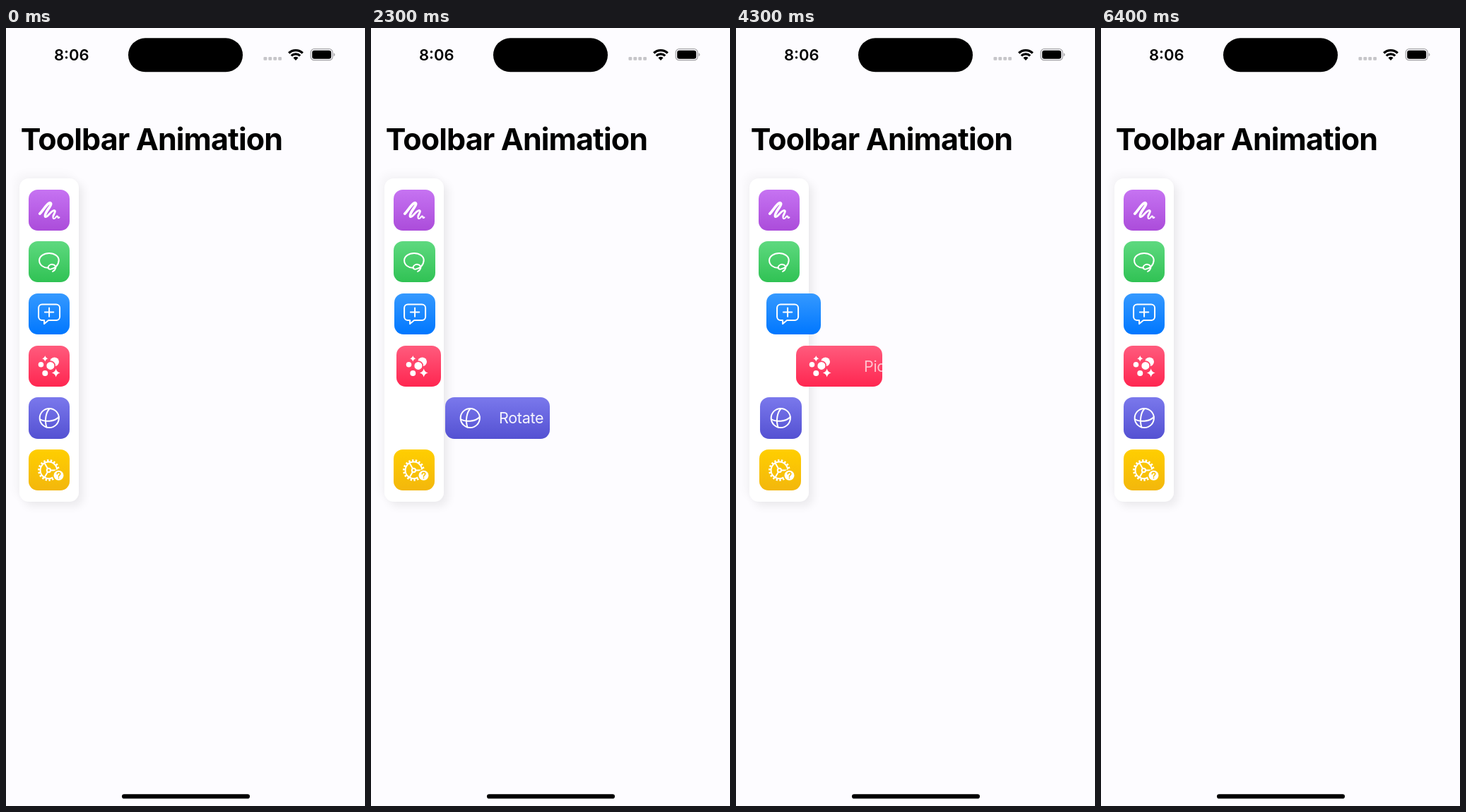
Write an HTML page that moves like this. It is 508 px wide and 1102 px high and loops after 6500 ms.

```html
<!DOCTYPE html>
<html lang="en">
<head>
<meta charset="utf-8">
<title>Toolbar Animation</title>
<style>
  html, body { margin: 0; width: 100%; height: 100%; overflow: hidden; background: #fdfcff; }
  body { position: relative; font-family: Inter, Roboto, sans-serif; }
  #chrome { position: absolute; left: 0; top: 0; }
  #panel {
    position: absolute; left: 19.4px; top: 213px; width: 84px; height: 457.5px;
    border-radius: 13px; background: #fff;
    box-shadow: 6px 6px 13px rgba(0, 0, 0, .075), -6px -6px 13px rgba(0, 0, 0, .035);
  }
  .tool { position: absolute; height: 58.2px; border-radius: 13px; overflow: hidden; }
  .tool svg {
    position: absolute; top: 0; width: 58.2px; height: 58.2px;
    fill: none; stroke: #fff; stroke-width: 2; stroke-linecap: round; stroke-linejoin: round;
  }
  .tool .solid { fill: #fff; stroke: none; }
  .tool span {
    position: absolute; top: 0; color: #fff; white-space: nowrap;
    font-size: 21.5px; line-height: 58.5px; letter-spacing: -.3px;
  }
</style>
</head>
<body>
<svg id="chrome" width="508" height="1102" viewBox="0 0 508 1102">
  <text x="68" y="46" font-size="22" font-weight="600">8:06</text>
  <rect x="173" y="14.3" width="162" height="48" rx="24"/>
  <g fill="#c6c5c9">
    <rect x="364.5" y="41" width="4.8" height="4.8" rx="1.2"/>
    <rect x="371.4" y="41" width="4.8" height="4.8" rx="1.2"/>
    <rect x="378.3" y="41" width="4.8" height="4.8" rx="1.2"/>
    <rect x="385.2" y="41" width="4.8" height="4.8" rx="1.2"/>
  </g>
  <g transform="translate(410 46)">
    <path d="M0 0L-3.5-3.7A5 5 0 0 1 3.5-3.7Z"/>
    <path d="M-6.2-6.6A9 9 0 0 1 6.2-6.6M-9.8-10.5A14.3 14.3 0 0 1 9.8-10.5" fill="none" stroke="#000" stroke-width="3.3"/>
  </g>
  <rect x="431.2" y="29.7" width="31" height="16" rx="5" fill="none" stroke="#a5a4a8" stroke-width="1.3"/>
  <rect x="433.2" y="31.7" width="27" height="12" rx="3.3"/>
  <path d="M463.7 35.2q1.8.7 1.8 2.5t-1.8 2.5z" fill="#a5a4a8"/>
  <text x="20.8" y="173.3" font-size="43" font-weight="700" letter-spacing="-.88">Toolbar Animation</text>
  <rect x="164" y="1085.3" width="181" height="6.2" rx="3.1"/>
</svg>
<div id="panel"></div>

<script>
const LOOP = 6500, STEP = 100;
const LEFT = 32.3, TOP = 228.6, PITCH = 73.7, SIZE = 58.2;
const SHIFT = 77.6, ICON_INSET = 6.46, LABEL_X = 181;
const OMEGA = 2 * Math.PI / 0.5;

const dot = (x, y, r, extra = '') => `<circle class="solid" cx="${x}" cy="${y}" r="${r}" ${extra}/>`;
const sparkle = (x, y, r) => {
  const c = r * 0.2;
  return `<path class="solid" d="M${x} ${y - r}Q${x + c} ${y - c} ${x + r} ${y}Q${x + c} ${y + c} ${x} ${y + r}` +
    `Q${x - c} ${y + c} ${x - r} ${y}Q${x - c} ${y - c} ${x} ${y - r}Z"/>`;
};

const icons = {
  scribble: `
    <path stroke-width="3.7" d="M-13.3 5C-9 1-4-8.5.5-10.3C3-11 3-8.5 1.5-6C-1-1.5-7 5-5.5 8.8"/>
    <path stroke-width="2.9" d="M-5.5 8.8C-3.5 12 2.5.5 7 .3C10 .8 7 5 5.8 8"/>
    <path stroke-width="2.1" d="M5.8 8C4.5 12 7 13 9 10.5C10.5 8.5 12 7.5 12.3 9.5C12.4 11.5 13.3 11.2 14.3 10.2"/>`,
  lasso: `
    <path d="M-1 8.6C-8 8.8-14 4.5-14-1.8C-14-8-7.5-12 0-12C7.5-12 13.6-8 13.6-2C13.6 4.5 8 9.8 2.5 10.5
      C-.5 10.8-2 9.3-1.4 7.4C-.5 4.7 2.5 3.5 5 3.8C8.5 4.2 9.8 7 9 9.5C8.4 11.7 7 13 5 13.8"/>`,
  comment: `
    <path d="M-10-13.7H10a5 5 0 0 1 5 5V4a5 5 0 0 1-5 5H-1L-7 14V9H-10a5 5 0 0 1-5-5V-8.7a5 5 0 0 1 5-5Z"/>
    <path d="M-6.2-2.5H6.2M0-8.7V3.7"/>`,
  bubbles:
    dot(7.5, -6.3, 6.4) +
    dot(1.8, -.7, 6.3, 'style="stroke:#ff4469;stroke-width:1.6"') +
    dot(-11.6, -2.4, 3.8) + dot(-5.8, 10, 4) +
    sparkle(-5.8, -10.8, 4.3) + sparkle(9.6, 9.3, 6),
  rotate: `
    <g transform="translate(.2 .4)">
      <circle r="13.6"/>
      <path d="M.5-13.5C-5-8-7 4-3.8 13M-13.5 1.5C-7 5.8 7 5.5 13.5-1.5"/>
    </g>`,
  settings: `
    <g transform="translate(-.7 .3)">
      <circle r="11.8"/>
      <circle r="13.9" stroke-width="2.8" stroke-linecap="butt" pathLength="36" stroke-dasharray="1 1"/>
      <circle r="2.6"/>
      <path d="M2.8 0H12M-1.4-2.4L-6-10.4M-1.4 2.4L-6 10.4"/>
    </g>
    <circle cx="13.4" cy="7.6" r="8.7" fill="#f8c106" stroke="none"/>
    ${dot(13.4, 7.6, 7)}
    <path stroke="#f8c106" stroke-width="1.7" d="M11.2 5.6C11.2 2.8 15.7 2.8 15.7 5.5C15.7 7.3 13.4 7.2 13.4 9M13.4 11.3v.1"/>`
};

// spans: [activated, deactivated] in ms for each visit of the finger
const tools = [
  { label: 'Scribble', icon: 'scribble', colors: ['#c673f2', '#ab4cda'], width: 171, spans: [[1050, 1214], [5051, 5490]] },
  { label: 'Lasso', icon: 'lasso', colors: ['#5ed97f', '#30c254'], width: 146, spans: [[1230, 1418], [4620, 5018]] },
  { label: 'Comment', icon: 'comment', colors: ['#3599ff', '#0077ff'], width: 184, spans: [[1446, 1690], [4247, 4580]] },
  { label: 'Picker', icon: 'bubbles', colors: ['#ff5b7d', '#ff2650'], width: 151, spans: [[1700, 1927], [3900, 4218]] },
  { label: 'Rotate', icon: 'rotate', colors: ['#7a78ec', '#5451d2'], width: 153, spans: [[1938, 2330], [3760, 3855]] },
  { label: 'Settings', icon: 'settings', colors: ['#ffce00', '#f3b70c'], width: 171, spans: [[2340, 3755]] }
];

tools.forEach((tool, i) => {
  const box = document.createElement('div');
  box.className = 'tool';
  box.style.top = TOP + i * PITCH + 'px';
  box.style.background = `linear-gradient(${tool.colors})`;
  box.innerHTML = `<svg viewBox="-29.1 -29.1 58.2 58.2">${icons[tool.icon]}</svg><span>${tool.label}</span>`;
  document.body.append(box);
  Object.assign(tool, { box, svg: box.firstChild, text: box.lastChild });
});

// Critically damped spring response
function spring(ms) {
  if (ms <= 0) return 0;
  const x = OMEGA * ms / 1000;
  return 1 - (1 + x) * Math.exp(-x);
}

function render(t) {
  for (const { box, svg, text, width, spans } of tools) {
    const p = spans.reduce((sum, [on, off]) => sum + spring(t - on) - spring(t - off), 0);
    const x = LEFT + SHIFT * p;
    box.style.left = x + 'px';
    box.style.width = SIZE + (width - SIZE) * p + 'px';
    svg.style.left = ICON_INSET * p + 'px';
    text.style.left = LABEL_X - x + 'px';
    text.style.opacity = p;
  }
}

const start = performance.now();
function tick() {
  const t = (performance.now() - start) % LOOP;
  render(Math.floor(t / STEP) * STEP);
  requestAnimationFrame(tick);
}
tick();
</script>
</body>
</html>
```
